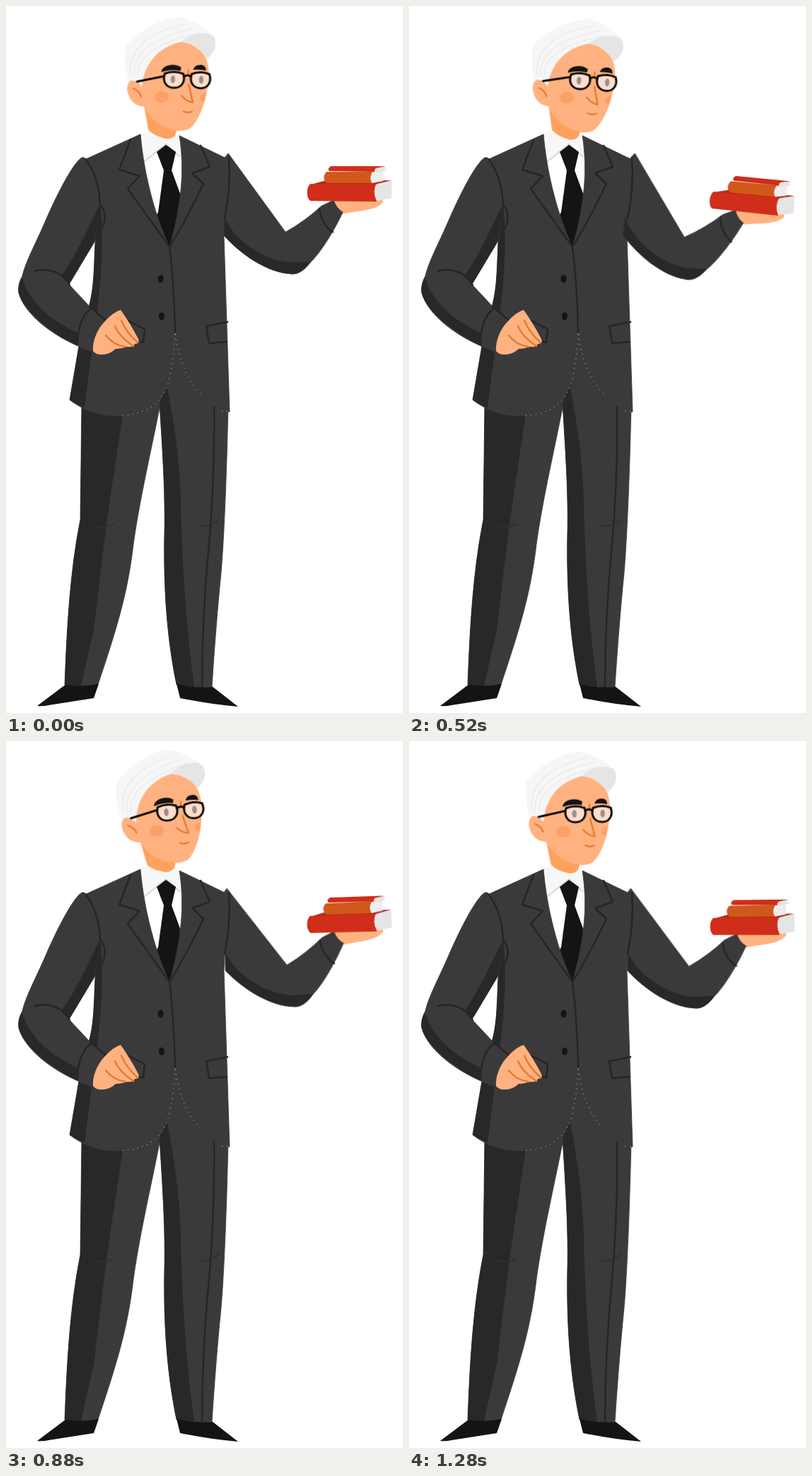
An HTML page for the animation above (1320 ms loop, 561 by 998 pixels).

```html
<!DOCTYPE html>
<html lang="en">
<head>
<meta charset="utf-8">
<title>Man with books</title>
<style>
  html, body { margin: 0; width: 100%; height: 100%; overflow: hidden; background: #fff; }
  svg { display: block; width: 561px; height: 998px; }
  .suit { fill: #3a3a3a; stroke: #3a3a3a; stroke-width: .8; }
  .shade { fill: #282828; }
  .black { fill: #141414; }
  .skin { fill: #ffb27f; }
  .blush { fill: #fba067; }
  .red { fill: #d02d1a; }
  .deep { fill: #b52616; }
  .page { fill: #e5e5e5; }
  .line { fill: none; stroke: #252525; stroke-width: 2.4; stroke-linecap: round; stroke-linejoin: round; }
  .thin { stroke-width: 2; stroke: #303030; }
  .crease { fill: none; stroke: #e27c35; stroke-width: 2.4; stroke-linecap: round; stroke-linejoin: round; }
  .strand { fill: none; stroke: #e6e6e6; stroke-width: 1.2; }
  .dots { fill: none; stroke: #fff; stroke-width: 1; stroke-dasharray: 1 6; opacity: .8; }
  .frame { fill: none; stroke: #0c0c0c; stroke-width: 3; stroke-linecap: round; }

  #head {
    transform-origin: 203px 190px;
    animation: nod 1320ms cubic-bezier(.364, 0, .636, 1) -300ms infinite;
  }
  #arm {
    transform-origin: 317px 262px;
    animation: lift 1320ms infinite;
  }
  @keyframes nod {
    0%, 100% { transform: rotate(-6.3deg); }
    43.5% { transform: rotate(7.1deg); }
  }
  @keyframes lift {
    0% { transform: rotate(0deg); animation-timing-function: cubic-bezier(.33, .38, .6, 1); }
    20.5% { transform: rotate(8.5deg); animation-timing-function: cubic-bezier(.34, 0, .636, 1); }
    79% { transform: rotate(-3.2deg); animation-timing-function: cubic-bezier(.47, 0, .745, .715); }
    100% { transform: rotate(0deg); }
  }
</style>
</head>
<body>
<svg viewBox="0 0 561 998">
  <!-- legs -->
  <path class="suit" d="M107 560L105 725C90 800 86 880 83 958Q108 964 130 958C156 880 172 830 180 760C190 690 207 620 218 562L232 480H120Z"/>
  <path class="shade" d="M107 560L105 725C90 800 86 880 83 958Q95 962 106 960L124 880C135 790 140 740 154 650L166 570Z"/>
  <path class="suit" d="M239 455L217 562C222 640 225 690 224 740C222 830 229 900 241 958Q266 964 291 961C295 900 299 850 304 800C309 740 312 650 314 565Z"/>
  <path class="shade" d="M226 528L217 562C222 640 225 690 224 740C222 830 229 900 241 958L266 961C256 890 249 800 247 700C246 640 236 580 226 528Z"/>
  <path class="line" d="M294 566C295 650 290 730 285 780C279 850 277 900 277 960"/>
  <path class="line thin" d="M125 733Q137 739 152 731M273 734Q290 735 301 724"/>
  <path class="black" d="M84 958L44 988Q52 989 60 987L124 977L131 957Q108 962 84 958Z"/>
  <path class="black" d="M241 957L246 977Q290 986 328 989L292 961Q265 963 241 957Z"/>

  <!-- shirt and tie -->
  <path fill="#fff" d="M190 181L245 183L252 260L231 340L195 250Z"/>
  <path fill="#f7f7f7" d="M190 180L201 176Q222 190 242 181L247 184L248 213L226 195L193 220Z"/>
  <path fill="none" stroke="#d6d6d6" stroke-width="2" d="M195 220L226 195L246 213"/>
  <path class="black" d="M213 206L226 196L240 206L234 232L248 270V300L231 343L210 300L215 291L223 232Z"/>

  <!-- jacket -->
  <path class="suit" d="M190 181L113 216L126 333C124 380 124 400 117 425L103 480L90 556C115 575 140 580 165 578C200 576 225 560 232 520C238 490 239 470 239 460C245 510 262 535 276 548Q290 563 305 572L316 573L308 325L309 300C315 270 317 240 315 216L309 214L245 183C250 215 253 265 231 340C212 300 195 240 190 181Z"/>
  <path class="shade" d="M133 275C138 330 135 380 130 420L121 490L111 567Q100 563 90 556L103 480L117 425C124 400 124 380 126 333Z"/>
  <path class="dots" d="M165 578C200 576 225 560 232 520C238 490 239 470 239 460C245 510 262 535 276 548M305 572H316"/>
  <path class="line" d="M176 189L160 231L189 240L172 258L231 340M275 197L288 227L263 236L279 251C265 280 250 310 231 340C236 380 238 420 239 460M313 446L283 452L287 476L312 474M172 444L196 456L194 475L180 472"/>
  <ellipse class="black" cx="218.500" cy="385" rx="4" ry="5.500"/>
  <ellipse class="black" cx="220" cy="438" rx="4" ry="5.500"/>

  <!-- resting arm -->
  <path class="suit" d="M107 214Q112 213 116 219C130 240 134 262 133 282L125 333L89 393L119 425L146 448L124 489L102 480C60 462 25 432 18 405Q16 394 23 381C28 360 42 335 55 305C70 270 94 222 107 214Z"/>
  <path class="shade" d="M134 278L125 333L89 393L78 381C100 352 117 310 134 278Z"/>
  <path class="shade" d="M23 384C18 390 17 400 18 405C25 432 70 465 102 480L103 462C75 450 35 425 23 384Z"/>
  <path class="line" d="M113 217C130 240 132 265 133 280C142 290 141 304 135 315M41 374C58 369 80 375 90 394M119 428C108 436 104 450 102 463M119 425L145 447"/>
  <path class="skin" d="M162 429Q175 447 187 470Q190 477 182 477Q180 482 171 481Q162 484 155 484Q145 493 134 492Q127 492 123 487C122 474 128 458 138 447Q151 432 162 429Z"/>
  <path class="crease" d="M163 444Q170 461 186 475M154 452Q160 467 180 480M141 465Q152 479 169 481"/>

  <!-- raised arm with books -->
  <g id="arm">
    <path class="skin" d="M462 272Q468 292 477 293L495 290C515 288 528 284 533 276L530 268H470Z"/>
    <path class="suit" d="M314 208L395 319Q422 304 446 282L463 274Q467 286 476 291C465 315 445 348 430 362C418 378 408 379 402 378C370 376 335 352 308 324V300C318 260 314 235 309 214Z"/>
    <path class="shade" d="M309 299C325 335 370 360 402 362L431 361C418 378 408 379 402 378C370 377 330 350 308 324Z"/>
    <path class="line" d="M443 286C444 300 453 314 462 319"/>
    <path class="deep" d="M430 252L453 246H545L524 252Z"/>
    <path class="red" d="M430 251H523Q518 262 524 276L430 275C424 271 424 256 430 251Z"/>
    <path class="page" d="M524 251L545 246V271L524 275C519 266 520 256 524 251Z"/>
    <path fill="#cf581a" d="M453 234H518Q513 242 517 250H453C448 246 448 238 453 234Z"/>
    <path fill="#eee" d="M518 234L533 230V247L517 250Q513 242 518 234Z"/>
    <path class="red" d="M459 226H537L523 229Q520 231 522 234L457 233Q453 230 459 226Z"/>
    <path class="page" d="M523 229L537 226L535 229L538 232L522 235Q519 232 523 229Z"/>
  </g>
  <path class="line" d="M315 214C317 240 315 270 309 300"/>

  <!-- head -->
  <g id="head">
    <path fill="#ffa15e" d="M193 135L201 175Q207 182 225 187Q235 188 239 182L242 172Z"/>
    <path class="skin" d="M245 48C268 53 280 66 282 76Q288 95 283 118C279 145 267 168 258 173Q248 177 240 175C222 172 203 161 194 142C182 142 172 133 170 118C170 103 180 101 191 113C185 75 210 50 245 48Z"/>
    <ellipse class="blush" cx="219" cy="128" rx="10" ry="8"/>
    <path class="blush" d="M281 121C270 123 271 135 279 134Q281 128 281 121Z"/>
    <path fill="#f6f6f6" d="M171 107C166 90 165 70 167 57C185 35 215 18 242 15C262 19 285 32 293 45C296 58 291 68 282 73C270 56 255 50 245 50C212 58 193 83 191 114Q181 102 171 107Z"/>
    <path fill="#e5e5e5" d="M246 49C258 38 280 33 291 41C297 52 293 64 282 73C274 61 262 51 246 49Z"/>
    <path class="strand" d="M174 98C170 58 205 35 250 25M179 98C178 64 210 43 261 31M185 98C184 70 215 50 270 37"/>
    <path class="crease" d="M179 117Q187 120 190 128M256 90V96M257 110L263 135Q254 134 247 126M250 148Q256 151 262 148"/>
    <g id="lenses">
      <path fill="#ffe9dc" fill-opacity=".8" class="lens" stroke="#0c0c0c" stroke-width="3" d="M223 95Q236 90 249 95C253 107 246 115 236 115C226 115 219 107 223 95ZM261 95Q274 90 286 95C290 107 283 115 274 115C264 115 257 107 261 95Z"/>
      <ellipse fill="#959290" cx="234.500" cy="103" rx="3.200" ry="5.500"/>
      <ellipse fill="#959290" cx="274.500" cy="103" rx="3.200" ry="5.500"/>
    </g>
    <path class="frame" d="M250 99Q255 95 260 99M184 107L221 99"/>
    <path class="black" d="M218 92C220 83 236 79 246 86L245 91Q232 88 218 93ZM263 89Q265 81 275 82Q281 83 281 90Q272 88 263 89Z"/>
  </g>
</svg>
</body>
</html>
```
